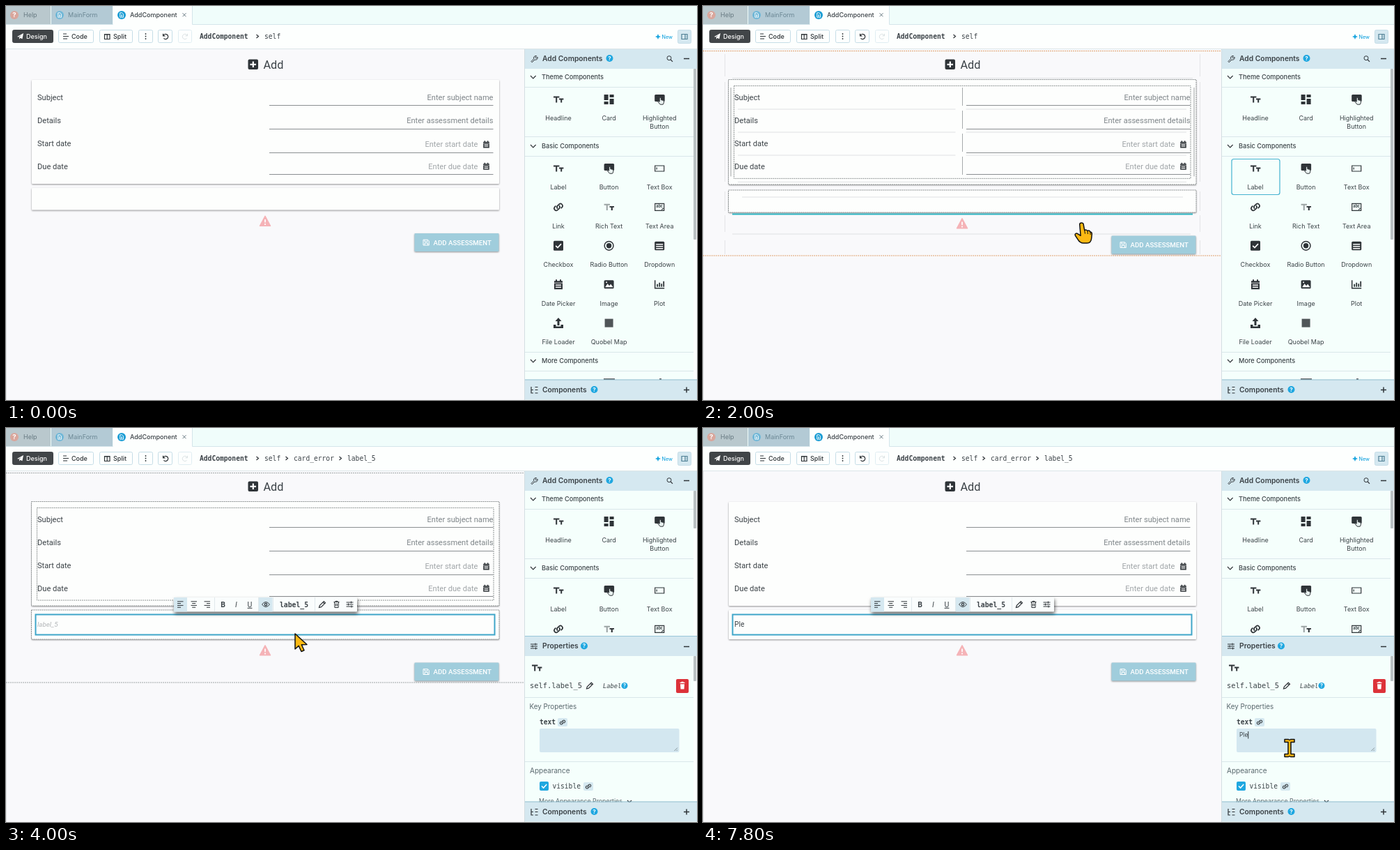
These frames come from a looping animation (992 px wide and 565 px high, 8000 ms). An HTML page:

```html
<!DOCTYPE html>
<html lang="en">
<head>
<meta charset="utf-8">
<title>Form designer</title>
<style>
  html, body { margin: 0; width: 100%; height: 100%; overflow: hidden; background: #f9f9fb; }
  svg { display: block; width: 100vw; height: 100vh; }
  text { font-family: Inter, "Open Sans", sans-serif; fill: #3b4247; white-space: pre; }
  .form text { font-family: Roboto, Arial, sans-serif; }
  text.mono { font-family: "DejaVu Sans Mono", "Noto Sans Mono", monospace; }
  .mid { text-anchor: middle; }
  .end { text-anchor: end; }
  .line { fill: none; stroke: #2f3438; stroke-width: 1.2; }
  .card { fill: #fdfefd; filter: drop-shadow(0 1px 1.2px rgba(0,0,0,.42)); }
  .bar { filter: drop-shadow(1px 3px 2.5px rgba(0,0,0,.6)); }
  .dash { fill: none; stroke: #8f9494; stroke-width: 1; stroke-dasharray: 2 1; }
</style>
</head>
<body>
<svg id="view" viewBox="0 0 992 565" preserveAspectRatio="none">
  <g id="chrome"></g><g id="canvas" class="form"></g><g id="panel"></g><g id="live"></g>
</svg>
<script>
const LOOP = 8000, STEP = 200;
const INK = '#2f3438', MINT = '#f5fffc', PALE = '#d5e8f0', BLUE = '#1fa7e0', RULE = '#d9e6ea';
const $ = id => document.getElementById(id);

// Markup helpers
const text = (x, y, s, size, attrs = '') => `<text x="${x}" y="${y}" font-size="${size}" ${attrs}>${s}</text>`;
const mono = (x, y, s, size = 9.65, attrs = '') => text(x, y, s, size, `class="mono" ${attrs}`);
const rect = (x, y, w, h, fill, attrs = '') => `<rect x="${x}" y="${y}" width="${w}" height="${h}" fill="${fill}" ${attrs}/>`;
const box = (l, t, r, b, attrs) => rect(l, t, r - l, b - t, 'none', attrs);
const fill = (d, color = INK, attrs = '') => `<path d="${d}" fill="${color}" ${attrs}/>`;
const line = (d, attrs = '') => `<path class="line" d="${d}" ${attrs}/>`;
const stroke = (d, color, w = 1) => `<path d="${d}" fill="none" stroke="${color}" stroke-width="${w}"/>`;
const dot = (x, y, r, color) => `<circle cx="${x}" cy="${y}" r="${r}" fill="${color}"/>`;
const at = (x, y, s, k = 1) => `<g transform="translate(${x} ${y}) scale(${k})">${s}</g>`;
const help = (x, y, r = 5, color = BLUE) => dot(x, y, r, color) +
  text(x, y + r * .54, '?', r * 1.6, 'class="mid" font-weight="700" style="fill:#fff"');
const chevron = (x, y) => line(`M${x - 1.5} ${y - 2.5}l3 2.5l-3 2.5`);

const pressHand = fill('M0-2q1-1.4 2.2 0v2.6l4 1v3.2l-1.2 2.4h-4l-3.4-4q.2-1.2 2.4 0z', '#e9f1f0', `stroke="${INK}"`);
const calendar = fill('M-6-5h2v-2h2v2h4v-2h2v2h2v12h-12z') +
  stroke('M-6-2h12', '#fff', .8) + stroke('M-4 1h8M-4 4h8', '#fff', 1.6);
const icon = {
  tt: fill('M-7-4.6h8.4v2h-3.2v7.2h-2v-7.2h-3.2zM1-1.4h6.4v1.8h-2.2v4.2h-2v-4.2h-2.2z'),
  card: fill('M-7-7h6v8h-6zM-7 3h6v4h-6zM1-7h6v4h-6zM1-1h6v8h-6z'),
  button: rect(-7, -7, 14.5, 10, INK, 'rx="1.5"') + pressHand,
  textBox: line('M-6.5-4h13v8h-13z') + line('M-4-1.5v3'),
  link: line('M-1 2.2a3 3 0 0 1-.4-4l2.6-2.4a3 3 0 0 1 4.2 4.2l-1.8 1.8M1-2.2a3 3 0 0 1 .4 4l-2.6 2.4a3 3 0 0 1-4.2-4.2l1.8-1.8', 'style="stroke-width:1.7"'),
  textArea: line('M-6.5-5h13v10h-13z') + text(-5, 1, 'abc', 5.5, 'font-weight="700"') + line('M3 4l2.5-2.5'),
  checkbox: rect(-7, -7, 14, 14, INK, 'rx="1.5"') + stroke('M-3.8 0l2.8 2.8l5-5.4', '#fff', 1.7),
  radio: '<circle class="line" r="6.4" style="stroke-width:1.5"/>' + dot(0, 0, 3.7, INK),
  dropdown: rect(-7, -6, 14, 12.5, INK, 'rx="1.5"') + stroke('M-5-2h10M-5 1h10M-5 4h10', '#fff', 1.4),
  calendar,
  image: rect(-7, -6, 14, 12, INK, 'rx="1.5"') + fill('M-5.5 4l3.5-5l2.5 3l2-2.5l3.5 4.5z', '#fff') + dot(-3.5, -3, 1, '#fff'),
  plot: line('M-6.5-6v11.5h13.5', 'style="stroke-width:1.5"') + stroke('M-3 3.5v-4M0 3.5v-6M3 3.5v-4.5M6 3.5v-8', INK, 1.8),
  loader: fill('M0-7.5l4.5 5h-3v6h-3v-6h-3zM-7 2.5h3.5v2.5h7v-2.5h3.5v5h-14z'),
  square: rect(-6, -6, 12, 12, '#505558'),
  pencil: line('M-4.5 4.5l.8-3l6-6l2.2 2.2l-6 6zM1-3.2l2.2 2.2'),
  trash: line('M-4-3.5h8M-1.5-3.5v-1.2h3v1.2M-3-3.5l.4 8h5.2l.4-8M-1-1.5v4M1-1.5v4', 'style="stroke-width:1"'),
  sliders: line('M-5-3h10M-5 0h10M-5 3h10M2-4.5v3M-2-1.5v3M2.5 1.5v3', 'style="stroke-width:1"'),
  doc: line('M-2.3-3.2h3l1.8 1.8v4.6h-4.8zM-1 0h2M-1 1.5h2', 'style="stroke:#fff;stroke-width:.9"'),
};
icon.rich = `<g opacity=".45">${icon.tt}</g>` + fill('M1-1.4h6.4v1.8h-2.2v4.2h-2v-4.2h-2.2z');

function chrome() {
  const button = (x, w, on) => rect(x, 34.5, w, 18, on ? '#414548' : '#fdfffe', `rx="2" stroke="${on ? '#414548' : '#c5dde7'}"`);
  const label = (x, s, color = INK) => text(x, 46.7, s, 9, `font-weight="500" style="fill:${color}"`);
  return rect(0, 0, 992, 27, '#f0fdfb') + rect(0, 27, 992, 34, '#fdfffe') +
    rect(0, 0, 64, 26.5, '#b9c8cd') + rect(65, 0, 88, 26.5, '#b3cad5') + rect(154, 0, 113, 27, '#fdfffe') +
    stroke('M0 26.5H153.5M267.5 0V26.5H992', '#d5e5ea') + stroke('M0 61.5H992', '#dce5e8') + stroke('M.5 62V565', '#e2e6e8') +
    help(12, 13, 6, '#d9a69c') + text(25, 16.3, 'Help', 9, 'style="fill:#697b83"') +
    dot(77, 13, 6, '#70b7d7') + at(77, 13, icon.doc) + text(89, 16.3, 'MainForm', 9, 'style="fill:#6b8794"') +
    dot(166, 13, 6, '#1b9dd4') + at(166, 13, icon.doc) + text(178, 16.3, 'AddComponent', 9, 'font-weight="500"') +
    stroke('M253.5 10.2l5 5m0-5l-5 5', '#697b83') +
    button(9.5, 58, true) + button(75.5, 50) + button(134.5, 47) + button(190.5, 20) + button(218.5, 20) +
    `<g opacity=".5">${button(247.5, 19)}</g>` +
    fill('M16 44l9-5l-1.6 8.2l-3-1.4l-1.4 2v-3l3.5-3.4l-4.5 3z', '#fff') + label(29, 'Design', '#fff') +
    line('M82 40h5M82 43.5h8M82 47h6') + label(94, 'Code') +
    line('M141.5 40.5h7.5v7h-7.5zM145.2 40.5v7M141.5 41h7.5') + label(154, 'Split') +
    [40, 43.5, 47].map(y => dot(200.5, y, .9, INK)).join('') +
    line('M225.5 39.8v3h3M225.8 42.5a3.6 3.6 0 1 1 .6 3.8') +
    stroke('M260.5 39.8v3h-3M260.2 42.5a3.6 3.6 0 1 0-.6 3.8', '#dbe2e4') +
    mono(278, 46.7, 'AddComponent', 9.65, 'font-weight="700"') + chevron(361, 43.5) + mono(371, 46.7, 'self') +
    fill('M936 40l1.2 2.8l2.8 1.2l-2.8 1.2l-1.2 2.8l-1.2-2.8l-2.8-1.2l2.8-1.2z', BLUE) +
    text(941.5, 46.7, 'New', 7.2, `font-weight="500" style="fill:${BLUE}"`) +
    rect(964.5, 34.5, 19, 19, PALE, 'rx="2" stroke="#c5dde7"') + line('M970 40.5h8v7h-8zM975 40.5v7', 'style="stroke:#4f7f94"');
}

const header = (y, title) => rect(745, y, 247, 28, PALE) + text(770, y + 17.4, title, 10.3, 'font-weight="600"');
const rule = y => stroke(`M745 ${y}H987`, RULE);

function componentPanel() {
  const section = (y, s) => line(`M753 ${y - 2}l3.8 3.8l3.8-3.8`) + text(769, y + 3.2, s, 9.2, 'font-weight="500"') + rule(y + 14.5);
  const item = (col, y, kind, name) => {
    const x = 793 + col * 72.6;
    return at(x, y, icon[kind]) + name.split('|').map((s, i) => text(x, y + 30.3 + i * 12, s, 9, 'class="mid"')).join('');
  };
  const items = [
    ['tt', 'Label'], ['button', 'Button'], ['textBox', 'Text Box'],
    ['link', 'Link'], ['rich', 'Rich Text'], ['textArea', 'Text Area'],
    ['checkbox', 'Checkbox'], ['radio', 'Radio Button'], ['dropdown', 'Dropdown'],
    ['calendar', 'Date Picker'], ['image', 'Image'], ['plot', 'Plot'],
    ['loader', 'File Loader'], ['square', 'Quobel Map'],
  ];
  return rect(745, 62, 247, 503, MINT) + rect(987, 89, 5, 447, '#fbfdfd') + stroke('M744.5 62V565', '#d3dee2') +
    header(62, 'Add Components') + help(866.5, 75) +
    line('M754 79.5l3.8-3.8a3 3 0 0 1 3.8-4l-1.8 1.9l1.4 1.4l1.8-1.8a3 3 0 0 1-4 3.8l-3.8 3.8z', 'style="stroke-width:1"') +
    '<circle class="line" cx="952" cy="74.7" r="3" style="stroke-width:1"/>' + line('M954.2 77l2.8 2.8') +
    stroke('M973 75.5h8', INK, 1.5) +
    section(102, 'Theme Components') + item(0, 134, 'tt', 'Headline') + item(1, 134, 'card', 'Card') +
    item(2, 134, 'button', 'Highlighted|Button') + rule(187.5) + section(201, 'Basic Components') +
    items.map(([kind, name], i) => item(i % 3, 233 + Math.floor(i / 3) * 55.4, kind, name)).join('') +
    rule(496.5) + section(509, 'More Components') +
    fill('M858 534h16v2h-16zM938 534h3v2h-3z', '#6b7275');
}

function componentsFooter() {
  return header(536.5, 'Components') + stroke('M745 536H992', '#86b6ca') + help(844.5, 550) +
    line('M754 546v9h3M754 550.5h3M759.5 546.5h4M759.5 550.5h4M759.5 555h4') + stroke('M973 550.5h8M977 546.5v8', INK, 1.5);
}

function properties(typed) {
  const chip = (x, y) => rect(x, y - 6, 14, 12, PALE, 'rx="2"') + at(x + 7, y, icon.link, .62);
  const soft = 'style="fill:#59676d"';
  return rect(745, 298, 247, 238, MINT) + rect(987, 327, 5, 209, '#fbfdfd') + header(299, 'Properties') +
    stroke('M745 298.5H992', '#9ac6d9') + at(758, 313, icon.sliders) + help(830, 312.5) + stroke('M973 313.5h8', INK, 1.5) +
    rect(987, 327, 4, 36, '#b9c0c2', 'rx="1"') +
    at(762, 344, icon.tt) + mono(752, 373.2, 'self.label_5', 10.4) + at(838, 369.5, icon.pencil) +
    mono(857, 373, 'Label', 8.7, 'font-style="italic"') + help(888, 369.5, 4.5) +
    rect(962, 360, 18, 20, '#dc3239', 'rx="2"') + fill('M967.5 366h7v-1.2h-2v-1h-3v1h-2zM968 367.2h6l-.5 7.3h-5z', '#fff') +
    rule(386.5) + text(751.5, 403.2, 'Key Properties', 9.8, soft) +
    mono(766, 425.2, 'text', 9.6, 'font-weight="700"') + chip(792, 422) +
    rect(766, 431, 200.5, 34, '#d3e7f0', 'rx="2"') + stroke('M959.5 463l4.5-4.5M962.5 463l1.5-1.5', '#6d7b80', .8) +
    text(770, 443.2, typed, 8.4, 'id="entry"') + `<path id="caret" stroke="${INK}"/>` +
    rule(478.5) + text(752, 495, 'Appearance', 10, soft) +
    rect(766, 507, 13, 13, BLUE, 'rx="2"') + stroke('M769 513.5l2.6 2.6l4.6-5', '#fff', 1.5) +
    mono(784.5, 517, 'visible', 9.6) + chip(829, 514) +
    text(765, 538, 'More Appearance Properties', 8.8, soft) + line('M892 534l3 3l3-3');
}

function formContent(F, C, bottom, inset) {
  const right = 699.5 - 2 * inset, left = 378 - inset;
  const row = (name, y, hint, hintY, under, date) =>
    text(45, y, name, 11.1) +
    text(date ? right - 22 : right, hintY, hint, 11.1, `class="end" style="fill:${date ? '#a0a5a8' : '#7e8589'}"`) +
    (date ? at(right - 10, hintY - 3.8, calendar, .72) : '') + stroke(`M${left} ${under}H${right}`, '#8b8f92');
  const y = bottom + 46.5;
  return rect(347.5, 76.5, 14.5, 14.5, INK, 'rx="2"') + stroke('M350.5 83.8h8.5M354.8 79.5v8.5', '#fff', 2.2) +
    text(369.5, 89.5, 'Add', 16.3) +
    `<rect class="card" x="37" y="106" width="${671 - inset}" height="${F - 106}" rx="1"/>` +
    row('Subject', 134.5, 'Enter subject name', 134.5, 142.5) +
    row('Details', 167.5, 'Enter assessment details', 168.3, 176.5) +
    row('Start date', 201, 'Enter start date', 202.2, 210.5, true) +
    row('Due date', 234, 'Enter due date', 233.6, 241.5, true) +
    `<rect class="card" x="37" y="${C}" width="671" height="${bottom - C}" rx="1"/>` +
    at(372, bottom + 16, fill('M0-7.2L7.5 6.8H-7.5z', '#f5b3b7', 'stroke="#f5b3b7" stroke-width="1.5" stroke-linejoin="round"') +
      stroke('M0-2.5v4.5M0 3.5v2', '#fff', 1.7)) +
    `<rect class="card" x="586.5" y="${y - 13}" width="121" height="26" rx="1" style="fill:#a0cddc"/>` +
    stroke(`M599 ${y - 3.8}h6.5l1.8 1.8v6h-8.3zM601 ${y - 3.5}v2.5h4v-2.5M601 ${y + 4}v-3h4.5v3`, '#fff') +
    text(613.5, y + 3.5, 'ADD ASSESSMENT', 9.7, 'font-weight="500" style="fill:#fff"');
}

function outlines(F, C, bottom, inset, dragging) {
  const end = bottom + 62, inner = 247 + (F - 255) * .35, edge = 700 - inset * 1.6;
  const across = stroke(`M0 64.5H744M0 ${end}H744`, dragging ? '#dfa06c' : '#9fa5a6').replace('/>', ' stroke-dasharray="2 1"/>');
  const frames = across + box(36.5, 105.5, 708 - inset, F, 'class="dash"') + box(44.5, 114.5, edge, inner, 'class="dash"') +
    box(36.5, C, 708, bottom, 'class="dash"');
  if (!dragging) return frames;
  const mid = 372.5 - inset, tail = edge - 6;
  const slots = [148, 181, 214].map(y => `M50 ${y}H${mid - 10}M${mid + 5} ${y}H${tail}`).join('');
  const posts = [117, 150, 183, 216].map(y => `M${mid} ${y}v26`).join('');
  const sides = [31.5, 713.5].map(x => `M${x} 69V101M${x} 109V${F - 4}M${x} ${C + 2}V${bottom - 2}M${x} ${bottom + 4}V${bottom + 28}M${x} ${bottom + 40}V${end - 2}`).join('');
  return frames + stroke(slots + `M50 ${inner + 5}H${tail}M56 ${C + 10}H689M42 ${bottom + 31}H700M42 103.5H703`, '#dfe1e3') +
    stroke(sides, '#e3e4e7') + stroke(posts, '#a5a9ab') + stroke(`M40 117V${inner - 3}M${edge + 5} 117V${inner - 3}`, '#9ea2a4');
}

function labelEditor(typed) {
  const align = (x, shift) => line([0, 1, 2, 3].map(i =>
    `M${x - 4 + (i % 2 ? shift : 0)} ${248.8 + i * 2.8}h${i % 2 ? 5 : 8.5}`).join(''), 'style="stroke-width:1"');
  const letter = (x, s, attrs) => text(x, 256.8, s, 10.5, `class="mid" ${attrs}`);
  return box(42.5, 267.5, 701.5, 296.5, 'stroke="#3fa6c9" stroke-width="2"') +
    text(45, 284.8, typed || 'label_5', typed ? 10.2 : 9.7, typed ? '' : 'font-style="italic" style="fill:#b3b6b8"') +
    rect(241, 243, 263, 20.5, '#fafdfd', 'class="bar" rx="1"') + rect(241, 243, 19, 20.5, PALE) + rect(363, 243, 19.5, 20.5, PALE) +
    stroke('M299.5 243v20M362.5 243v20M383.5 243v20M443.5 243v20', '#e1e9ec') +
    align(250, 0) + align(269.5, 1.7) + align(288.5, 3.5) +
    letter(311.5, 'B', 'font-weight="700"') + letter(330.5, 'I', 'font-style="italic"') + letter(350, 'U', 'text-decoration="underline"') +
    line('M367.5 253q5.5-7 11 0q-5.5 7-11 0z', 'style="stroke-width:1"') + '<circle class="line" cx="373" cy="253" r="1.7"/>' +
    mono(393, 256.5, 'label_5', 9.75, 'font-weight="700"') +
    at(454, 253, icon.pencil) + at(474.5, 253, icon.trash) + at(493.5, 253, icon.sliders);
}

const cursor = {
  arrow: 'M0 0V22L5.2 17.4L9 25.5L13 23.7L9.3 15.8L17 15.5Z',
  hand: 'M-2.6 1.2C-2.6-1.6 2.4-2 2.8 1L4.4 9.6C6.2 8.6 8 9 8.6 10.5C10.5 9.5 12.3 10.5 12.6 12C14.3 12 15 13.5 15 15L14.4 21C14 25.5 12 28 8 28H3C-1 28-3.6 25.6-5.3 22.6L-9 17C-10 14.4-7.4 13.2-5.4 14.6L-1.2 17.3Z',
  beam: 'M-7-12.5H-1.5L0-11.5L1.5-12.5H7V-8.5H2V8.5H7V12.5H1.5L0 11.5L-1.5 12.5H-7V8.5H-2V-8.5H-7Z',
};
const drawCursor = (kind, x, y) => at(x, y, fill(cursor[kind], '#fdb913', 'stroke="#111" stroke-width="1.5" stroke-linejoin="round"') +
  (kind === 'hand' ? stroke('M4.4 9.6l.8 5M8.6 10.5l.6 4.5M12.6 12l.2 4', '#111') : ''));

// Rows of [time, ...values], linear between rows
const pointer = [[200, 830, 548], [600, 793, 250], [800, 790, 250], [1000, 765, 268], [1200, 715, 292], [1400, 676, 297],
  [1800, 600, 318], [2400, 430, 300], [2800, 410, 280], [3000, 409, 280], [3400, 408, 289], [3800, 408, 284],
  [4000, 415, 295], [4600, 527, 424], [4800, 540, 434], [5200, 690, 446], [5600, 828, 444], [5800, 834, 443],
  [6200, 835, 445], [6800, 842, 459]];
const layout = [[800, 255, 261, 31.5, 0], [1000, 256, 264, 32, 0], [1400, 260, 272, 32, 5], [1600, 260, 271, 32, 5],
  [1800, 256, 264, 32, 0], [2400, 256, 264, 32, 0], [2800, 263, 278, 32, 0], [3000, 263, 278, 32, 0],
  [3200, 256, 264, 32, 0], [3800, 256, 264, 32, 0], [4000, 255, 261, 42, 0]];

function sample(rows, t) {
  const i = rows.findIndex(r => r[0] > t);
  if (i === 0) return rows[0].slice(1);
  if (i < 0) return rows[rows.length - 1].slice(1);
  const a = rows[i - 1], b = rows[i], k = (t - a[0]) / (b[0] - a[0]);
  return a.slice(1).map((v, n) => v + (b[n + 1] - v) * k);
}

function dropMark(t, C, bottom) {
  if (t < 1200) return '';
  if (t < 1800) return stroke(`M713.8 ${C + 1}V${bottom}`, '#3a9fc4', 2);
  const y = t >= 2600 && t < 3200 ? C - 6.8 : bottom + 2.5;
  return stroke(`M42 ${y}H703`, '#2bb3c0', 2);
}

function draw(t) {
  const dragging = t >= 1000 && t < 4000, dropped = t >= 4000;
  const [F, C, h, inset] = sample(layout, t), bottom = C + h;
  const typed = t >= 7800 ? 'Ple' : t >= 7600 ? 'Pl' : '';

  $('canvas').innerHTML = formContent(F, C, bottom, inset) +
    (dragging || dropped && t < 4800 ? outlines(F, C, bottom, inset, dragging) : '') +
    (dragging ? dropMark(t, C, bottom) : '') +
    (dropped ? labelEditor(typed) : '') +
    (t >= 4400 && t < 4800 ? box(34.5, 334.5, 709.5, 364, 'stroke="#7fc4de" stroke-width="1.5"') : '');

  const [x, y] = sample(pointer, t);
  const kind = t >= 600 && t < 4000 ? 'hand' : x > 766 && t > 5000 ? 'beam' : 'arrow';
  $('live').innerHTML = rect(987, 90, 4, dropped ? 54 : 245, '#b9c0c2', 'rx="1"') +
    (t >= 600 && !dropped ? box(759, 219.5, 828, 270.5, 'stroke="#45b2d0" stroke-width="1.2" rx="3"') : '') +
    (dropped ? chevron(403, 43.5) + mono(413, 46.7, 'card_error') + chevron(480, 43.5) + mono(490, 46.7, 'label_5') +
      properties(typed) : '') +
    componentsFooter() + (t >= 200 ? drawCursor(kind, x, y) : '');

  if (t >= 7200 || t >= 6200 && t < 6800) {
    const end = 770.5 + (typed ? $('entry').getComputedTextLength() : 0);
    $('caret').setAttribute('d', `M${end} 435v10.5`);
  }
}

$('chrome').innerHTML = rect(0, 0, 992, 565, '#f9f9fb') + chrome();
$('panel').innerHTML = componentPanel();
let shown = -1;
function tick() {
  const t = Math.floor(performance.now() % LOOP / STEP) * STEP;
  if (t !== shown) draw(shown = t);
  requestAnimationFrame(tick);
}
tick();
</script>
</body>
</html>
```
